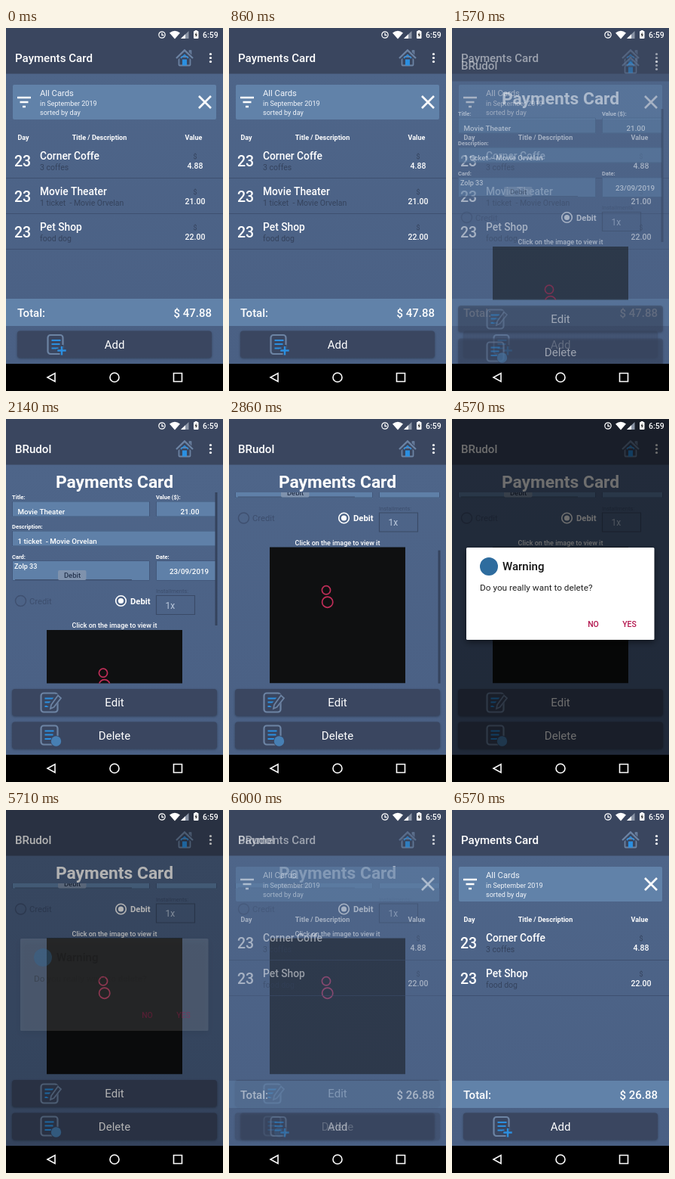
An HTML page with a canvas that plays this animation: 288 px wide and 480 px high, repeating every 7.14 s.

```html
<!DOCTYPE html>
<html lang="en">
<head>
<meta charset="utf-8">
<title>Payments Card</title>
<style>
  html, body { margin: 0; width: 100%; height: 100%; overflow: hidden; background: #000; }
  canvas { display: block; width: 288px; height: 480px; }
</style>
</head>
<body>
<canvas id="stage"></canvas>
<script>
const LOOP = 7140, TICK = 142.8;
const DARK = '#35435d', BAR = '#6182a9', BUTTON = '#3a4660', BLUE = '#2b8fe0', STEEL = '#6c83a3';
const canvas = document.getElementById('stage');
const c = canvas.getContext('2d');
const density = window.devicePixelRatio || 1;
canvas.width = 288 * density;
canvas.height = 480 * density;

const purchases = [
  { title: 'Corner Coffe', note: '3 coffes', value: '4.88' },
  { title: 'Movie Theater', note: '1 ticket  - Movie Orvelan', value: '21.00' },
  { title: 'Pet Shop', note: 'food dog', value: '22.00' }
];

const clamp = v => Math.max(0, Math.min(1, v));
const smooth = v => (v = clamp(v), v * v * (3 - 2 * v));

function rect(x, y, w, h, color, radius = 0) {
  c.fillStyle = color;
  c.beginPath();
  c.roundRect(x, y, w, h, radius);
  c.fill();
}

function outline(x, y, w, h, color, width = 1, radius = 0) {
  c.strokeStyle = color;
  c.lineWidth = width;
  c.beginPath();
  c.roundRect(x, y, w, h, radius);
  c.stroke();
}

function text(str, x, y, size, weight = 400, color = '#fff', align = 'left') {
  c.font = `${weight} ${size}px Roboto, sans-serif`;
  c.textAlign = align;
  c.fillStyle = color;
  c.fillText(str, x, y);
}

function line(path, color, width = 1.5) {
  c.strokeStyle = color;
  c.lineWidth = width;
  c.stroke(new Path2D(path));
}

function shape(path, color) {
  c.fillStyle = color;
  c.fill(new Path2D(path));
}

function circle(x, y, r, color, width) {
  c.beginPath();
  c.arc(x, y, r, 0, Math.PI * 2);
  c.fillStyle = c.strokeStyle = color;
  if (width) { c.lineWidth = width; c.stroke(); } else c.fill();
}

function withAlpha(alpha, draw) {
  c.save();
  c.globalAlpha *= alpha;
  draw();
  c.restore();
}

function shadow(alpha, blur, offset) {
  c.shadowColor = `rgba(0,0,0,${alpha})`;
  c.shadowBlur = blur * density;
  c.shadowOffsetY = offset * density;
}

function statusIcons() {
  circle(207, 9, 4.2, '#fff', 1.2);
  line('M207 6.5V9.500H209.500', '#fff', 1.3);
  shape('M217 6.500Q224 1 231 6.500L224 14.500Z', '#fff');
  shape('M242.500 4V14H232Z', '#8b95a6');
  shape('M238 8.300V14H232Z', '#fff');
  rect(249, 4, 6.5, 10, '#fff', 1);
  rect(250.7, 3, 3, 2, '#fff');
  shape('M252.700 5.500L250.500 9.500H252L251.700 12.500L254 8.500H252.500Z', '#222');
  text('6:59', 261, 13, 10.5, 500);
}

function navBar() {
  rect(0, 444, 288, 36, '#000');
  line('M65 456.500V467.500L55 462Z', '#fff', 1.6);
  circle(144, 462, 6, '#fff', 1.6);
  outline(222.5, 456.5, 11, 11, '#fff', 1.6);
}

function page(title) {
  const fill = c.createLinearGradient(0, 60, 0, 444);
  fill.addColorStop(0, '#4e6589');
  fill.addColorStop(1, '#4a6084');
  rect(0, 60, 288, 384, fill);
  rect(0, 0, 288, 60.5, '#3a465f');
  text(title, 12, 45, 15.1, 500);
  outline(229.5, 38, 15, 11.5, STEEL, 1.8, 1);
  line('M243.500 35V30H245.500V37', STEEL, 1.6);
  line('M226 40.500L237 30L248 40.500', '#3a465f', 5);
  line('M226 40L237 29.500L248 40', STEEL, 2.4);
  line('M232 40L237 35.500L242 40', BLUE, 1.6);
  rect(234, 41.5, 6, 8, BLUE);
  for (const y of [34.5, 39.5, 44.5]) circle(271.5, y, 1.6, '#fff');
}

function button(x, y, w, label) {
  c.save();
  shadow(0.35, 3, 1);
  rect(x, y, w, 35.5, BUTTON, 4);
  c.restore();
  text(label, 144, y + 23.2, 15, 400, '#fff', 'center');
}

function paper(x, y, w, h) {
  outline(x, y, w, h, STEEL, 2.2, 3.5);
  line(`M${x + 5} ${y + 7}H${x + 17}M${x + 5} ${y + 12}H${x + 16}M${x + 5} ${y + 17.5}H${x + 14}`, BLUE, 2.2);
}

function listPage(rows) {
  page('Payments Card');
  rect(9, 75, 270, 46, BAR, 2);
  line('M15 92H33M18.500 98H29.500M22 104H26', '#fff', 2.4);
  line('M256 90L272 106M272 90L256 106', '#fff', 2.6);
  text('All Cards', 45, 90, 11.25, 400, '#f2f5fa');
  text('in September 2019', 45, 103, 9, 400, '#f2f5fa');
  text('sorted by day', 45, 115, 9, 400, '#f2f5fa');

  text('Day', 23, 147.5, 9, 700, '#fff', 'center');
  text('Title / Description', 124, 147.5, 9, 700, '#fff', 'center');
  text('Value', 249, 147.5, 9, 700, '#fff', 'center');
  rows.forEach((row, i) => {
    const y = 151 + i * 47;
    text('23', 11, y + 31.5, 19.5, 500);
    text(row.title, 45, y + 23, 13.8, 500);
    text(row.note, 45, y + 37, 10.5, 400, DARK);
    text('$', 251, y + 21.5, 9, 400, DARK, 'center');
    text(row.value, 251, y + 35, 10.5, 500, '#fff', 'center');
    rect(0, y + 47, 288, 1, '#3e5070');
  });

  const total = rows.reduce((sum, row) => sum + Number(row.value), 0);
  rect(0, 358, 288, 36, BAR);
  text('Total:', 15, 381.5, 15, 500);
  text('$ ' + total.toFixed(2), 273, 381.5, 15, 500, '#fff', 'right');
  button(15, 400.6, 258, 'Add');
  paper(55.5, 406, 20, 25);
  line('M74 419V434M67 426.500H81', BUTTON, 5);
  line('M74 421V432.500M68.300 426.500H79.700', BLUE, 2.4);
}

function field(label, x, y, w, h) {
  text(label, x, y - 2.5, 7.5, 700);
  rect(x, y, w, h, '#5f80a8');
  outline(x + 0.5, y + 0.5, w - 1, h - 1, '#43587b');
}

function form() {
  field('Title:', 8, 108.5, 183, 21);
  text('Movie Theater', 15.5, 126, 9.75, 500);
  field('Value ($):', 199, 108.5, 81, 21);
  text('21.00', 244, 126, 9.75, 500, '#fff', 'center');
  field('Description:', 8, 147.5, 272, 21);
  text(purchases[1].note, 15.5, 165, 9.75, 500);
  field('Card:', 8, 187, 183, 27);
  text('Zolp 33', 11, 198, 9, 500);
  line('M12 212.500H167', '#40516f', 1);
  rect(69, 200, 37.5, 13, '#7f92ad', 2);
  text('Debit', 88, 210, 9.5, 500, '#26354f', 'center');
  field('Date:', 199, 187, 81, 27);
  text('23/09/2019', 243, 204.5, 9.75, 500, '#fff', 'center');

  circle(19.5, 240.5, 7, '#3f5070', 1.5);
  text('Credit', 31, 244.5, 11.25, 400, '#3d4e6d');
  circle(152.5, 240.5, 6.8, '#fff', 1.6);
  circle(152.5, 240.5, 3.6, '#fff');
  text('Debit', 165, 244.5, 11.25, 700);
  text('Installments:', 199, 230, 7.5, 400, '#3d4e6d');
  outline(199.5, 233.5, 51, 25, '#3a4a67', 1.2);
  text('1x', 211.5, 250.5, 12, 400, '#bccadd');

  text('Click on the image to view it', 144, 276, 9, 500, '#fff', 'center');
  rect(54, 279, 180, 180, '#0f1011');
  circle(129, 335.8, 5.6, '#c02d58', 1.7);
  circle(130.7, 351.7, 7.1, '#c02d58', 1.7);
}

function detailPage(scroll, barAlpha, pressed) {
  page('BRudol');
  text('Payments Card', 144, 91.3, 22.8, 700, '#fff', 'center');
  c.save();
  c.beginPath();
  c.rect(0, 97, 288, 252.5);
  c.clip();
  c.translate(0, -scroll);
  form();
  c.restore();
  withAlpha(barAlpha, () => rect(277.5, 97 + scroll * 0.7, 3, 176, '#35435d'));

  button(8, 357, 272, 'Edit');
  paper(46.5, 362.5, 22, 25);
  line('M58 382L71 366', BUTTON, 9);
  line('M60 378L69 365.500L73 369L63.500 381L59 383Z', STEEL, 1.8);
  button(8, 400.6, 272, 'Delete');
  paper(46.5, 405.5, 22, 25);
  circle(66.5, 426, 7.5, BUTTON);
  circle(66.5, 426, 6.7, '#477fb3');
  if (pressed) rect(8, 400.6, 272, 35.5, 'rgba(255,255,255,.08)', 4);
}

function dialog(alpha) {
  withAlpha(alpha, () => {
    shadow(0.5, 8, 3);
    rect(19, 170, 249.5, 122, '#fff', 1.5);
  });
  withAlpha(Math.sqrt(alpha), () => {
    circle(49, 195, 12, '#2e6c9e');
    text('Warning', 67, 200, 15, 500, '#111');
    text('Do you really want to delete?', 37, 227, 11.8, 400, '#222');
    text('NO', 187.5, 275, 10.5, 500, '#b3164e', 'center');
    text('YES', 235.5, 275, 10.5, 500, '#b3164e', 'center');
  });
}

function draw(time) {
  const tick = Math.floor((time + 5) / TICK);
  c.setTransform(density, 0, 0, density, 0, 0);
  c.clearRect(0, 0, 288, 480);

  const opening = clamp((tick - 10) / 2);
  const closing = clamp((tick - 41) / 2);
  if (opening < 1) listPage(purchases);
  if (opening > 0 && closing < 1) withAlpha(opening, () => {
    c.translate(0, 20 * (1 - opening));
    const scroll = 109.5 * smooth((tick - 15) / 5);
    const barAlpha = clamp((25 - tick) / 2);
    detailPage(scroll, barAlpha, tick === 29 || tick === 30);
  });

  const shown = tick < 40 ? clamp((tick - 30) / 2) : tick === 40 ? 0.11 : 0;
  if (shown > 0) {
    const dim = tick === 40 ? 0.3 : 0.57 * shown;
    rect(0, 0, 288, 444, `rgba(0,0,0,${dim})`);
    dialog(shown);
  }
  if (closing > 0) withAlpha(closing, () => listPage([purchases[0], purchases[2]]));

  statusIcons();
  navBar();
}

const start = performance.now();
function frame() {
  draw((performance.now() - start) % LOOP);
  requestAnimationFrame(frame);
}
frame();
</script>
</body>
</html>
```
